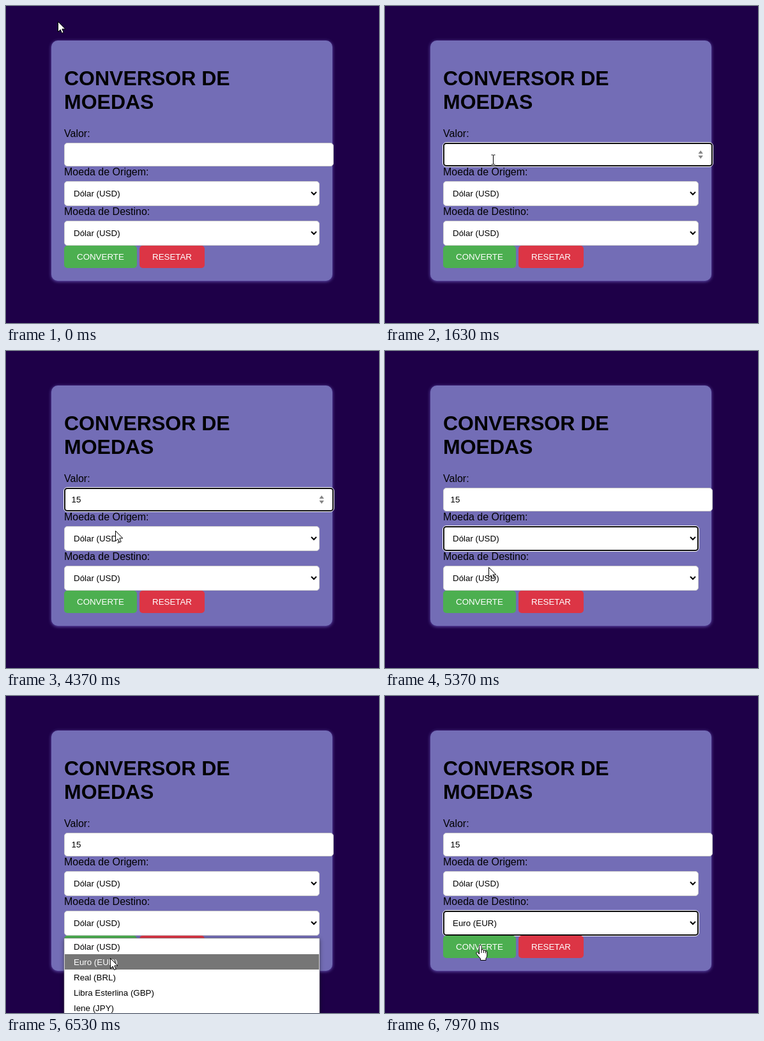
An HTML page for the animation above (8000 ms loop, 584 by 496 pixels).

```html
<!DOCTYPE html>
<html lang="pt">
<head>
<meta charset="utf-8">
<title>Conversor de moedas</title>
<style>
  html, body { margin: 0; width: 100%; height: 100%; overflow: hidden; background: #1e0048; }
  svg { display: block; font: 13.333px "Liberation Sans", Arial, sans-serif; }
  .title { font-size: 32px; font-weight: bold; }
  .label { font-size: 16px; }
  .card { fill: #736db6; filter: drop-shadow(0 1px 2.5px rgba(125, 110, 215, .8)); }
  .field { fill: #fff; stroke: #ccc; }
  .list { filter: drop-shadow(0 2px 3px rgba(0, 0, 0, .45)); }
  .light { fill: #fff; }
</style>
</head>
<body>
<svg id="stage" width="584" height="496" viewBox="0 0 584 496"></svg>
<script>
const LOOP = 8000;
const OPTIONS = ["Dólar (USD)", "Euro (EUR)", "Real (BRL)", "Libra Esterlina (GBP)", "Iene (JPY)"];
const ROW = 24;

// Moments of user actions, in ms
const CLICK_INPUT = 1120, KEY_1 = 2600, KEY_5 = 3450;
const OPEN_FROM = 4600, PICK_FROM = 5200, OPEN_TO = 5720, PICK_TO = 6760;

// Pointer stops: time, x, y
const PATH = [
  [0, 82, 24], [350, 82, 24], [1020, 169, 240], [3850, 169, 240],
  [4370, 172, 281], [4560, 172, 290], [4700, 172, 290], [5060, 166, 330],
  [5250, 165, 331], [5600, 157, 357], [5780, 156, 359], [6000, 155, 372],
  [6200, 155, 375], [6600, 165, 413], [7250, 165, 413], [7680, 149, 390], [LOOP, 149, 390]
];

const text = (x, y, s, cls = "") => `<text x="${x}" y="${y}" class="${cls}">${s}</text>`;
const box = (x, y, w, h, attrs) => `<rect x="${x}" y="${y}" width="${w}" height="${h}" ${attrs}/>`;
const field = (y, w, h) => box(91.5, y + .5, w - 1, h - 1, 'rx="4.5" class="field"');
const ring = (id, y, w, h) => `<g id="${id}" fill="none">
  ${box(90.5, y - .5, w + 1, h + 1, 'rx="5.5" stroke="#fff"')}
  ${box(92, y + 1, w - 2, h - 2, 'rx="4" stroke="#101010" stroke-width="2"')}</g>`;
const select = (id, y) => field(y, 400, 39) +
  `<text id="${id}" x="106" y="${y + 23.5}"></text>
   <path d="M478 ${y + 17}l4 4l4 -4" fill="none" stroke="#000" stroke-width="2"/>` +
  ring(id + "Ring", y, 400, 39);
const list = (id, y) => `<g id="${id}" class="list">
  ${box(91, y, 400, OPTIONS.length * ROW + 2, 'fill="#fff" stroke="#767676" stroke-width=".6"')}
  ${box(92, y + 1, 398, ROW, `id="${id}Hover" fill="#767676"`)}
  ${OPTIONS.map((s, i) => text(106, y + 18 + i * ROW, s)).join("")}</g>`;

document.getElementById("stage").innerHTML =
  box(0, 0, 584, 496, 'fill="#1e0048"') +
  box(71, 54, 440, 376, 'rx="10" class="card"') +
  text(91, 124, "CONVERSOR DE", "title") + text(91, 161, "MOEDAS", "title") +
  text(91, 205, "Valor:", "label") +
  text(91, 265, "Moeda de Origem:", "label") +
  text(91, 327, "Moeda de Destino:", "label") +
  field(214, 422, 37) + ring("inputRing", 214, 422, 37) +
  `<text id="value" x="102.5" y="237"></text>
   <path id="caret" d="M0 225V240" stroke="#000"/>
   <path id="spin" d="M490.5 231l3.7 -5l3.7 5zM490.5 234l3.7 5l3.7 -5z" fill="#858585"/>` +
  select("from", 274) + select("to", 336) +
  box(91, 375, 114, 35, 'rx="5" fill="#4caf50"') + text(111, 397, "CONVERTE", "light") +
  box(209, 375, 102, 35, 'rx="5" fill="#dc3545"') + text(229, 397, "RESETAR", "light") +
  list("fromList", 317) + list("toList", 379) +
  `<g id="pointer">
    <path id="arrow" d="M-.5 .5V16.5L3.2 13L5.6 18.5L8.2 17.4L5.8 12H10.8Z" fill="#fff" stroke="#000"/>
    <g id="beam" fill="none">
      <path d="M-3 -7.5H3M-3 7.5H3M0 -7.5V7.5" stroke="#fff" stroke-width="3"/>
      <path d="M-3 -7.5H-1L0 -7L1 -7.5H3M-3 7.5H-1L0 7L1 7.5H3M0 -7V7" stroke="#000"/>
    </g>
    <g id="hand" stroke="#000" stroke-linejoin="round">
      <path d="M-1.5 14V1.5Q-1.5 -.5 .2 -.5T2 1.5V7Q4.8 5.6 5.4 8Q8 6.8 8.4 9Q10.8 8.3 10.8 11V16Q10.8 18.5 9 20.5V23.5H.5V21L-5.8 13.5Q-6.8 11 -4.6 10.6Q-3 10.8 -1.5 14Z" fill="#fff"/>
      <path d="M2 7V12M5.4 8V12M8.4 9V12.5" fill="none"/>
    </g>
  </g>`;

const el = id => document.getElementById(id);
const show = (id, on) => el(id).setAttribute("visibility", on ? "visible" : "hidden");
const within = (t, a, b) => t >= a && t < b;

function pointerAt(t) {
  let i = 0;
  while (i < PATH.length - 2 && t >= PATH[i + 1][0]) i++;
  const [t0, x0, y0] = PATH[i], [t1, x1, y1] = PATH[i + 1];
  const p = (t - t0) / (t1 - t0), e = p * p * (3 - 2 * p);
  return [x0 + (x1 - x0) * e, y0 + (y1 - y0) * e];
}

function pointerKind(x, y, listOpen) {
  const over = (l, t, r, b) => within(x, l, r) && within(y, t, b);
  if (listOpen) return "arrow";
  if (over(91, 375, 205, 410) || over(209, 375, 311, 410)) return "hand";
  const onText = over(91, 95, 350, 132) || over(91, 132, 231, 169) || over(91, 190, 131, 209) ||
    over(91, 214, 513, 251) || over(91, 251, 223, 270) || over(91, 313, 225, 332);
  return onText ? "beam" : "arrow";
}

function updateList(id, open, y, top) {
  show(id, open);
  const row = Math.max(0, Math.min(OPTIONS.length - 1, Math.floor((y - top - 1) / ROW)));
  el(id + "Hover").setAttribute("y", top + 1 + row * ROW);
  el(id).querySelectorAll("text").forEach((n, i) => n.setAttribute("fill", i === row ? "#fff" : "#000"));
}

function draw(t) {
  const [x, y] = pointerAt(t);
  const fromOpen = within(t, OPEN_FROM, PICK_FROM), toOpen = within(t, OPEN_TO, PICK_TO);
  const focused = within(t, CLICK_INPUT, OPEN_FROM);
  const value = t < KEY_1 ? "" : t < KEY_5 ? "1" : "15";
  const lastAct = t < KEY_1 ? CLICK_INPUT : t < KEY_5 ? KEY_1 : KEY_5;

  el("value").textContent = value;
  el("caret").setAttribute("transform", `translate(${102.5 + Math.round(value.length * 7.4)} 0)`);
  show("caret", focused && (t - lastAct) % 1000 < 500);
  show("inputRing", focused);
  show("spin", focused || (within(y, 214, 251) && x > 91));

  el("from").textContent = OPTIONS[0];
  el("to").textContent = OPTIONS[t < PICK_TO ? 0 : 1];
  show("fromRing", within(t, PICK_FROM, OPEN_TO));
  show("toRing", t >= PICK_TO);
  updateList("fromList", fromOpen, y, 317);
  updateList("toList", toOpen, y, 379);

  const kind = pointerKind(x, y, fromOpen || toOpen);
  for (const k of ["arrow", "beam", "hand"]) show(k, k === kind);
  const offset = kind === "beam" ? .5 : 0;
  el("pointer").setAttribute("transform", `translate(${Math.round(x) + offset} ${Math.round(y) + offset})`);
}

const start = performance.now();
function tick() {
  draw((performance.now() - start) % LOOP);
  requestAnimationFrame(tick);
}
tick();
</script>
</body>
</html>
```
